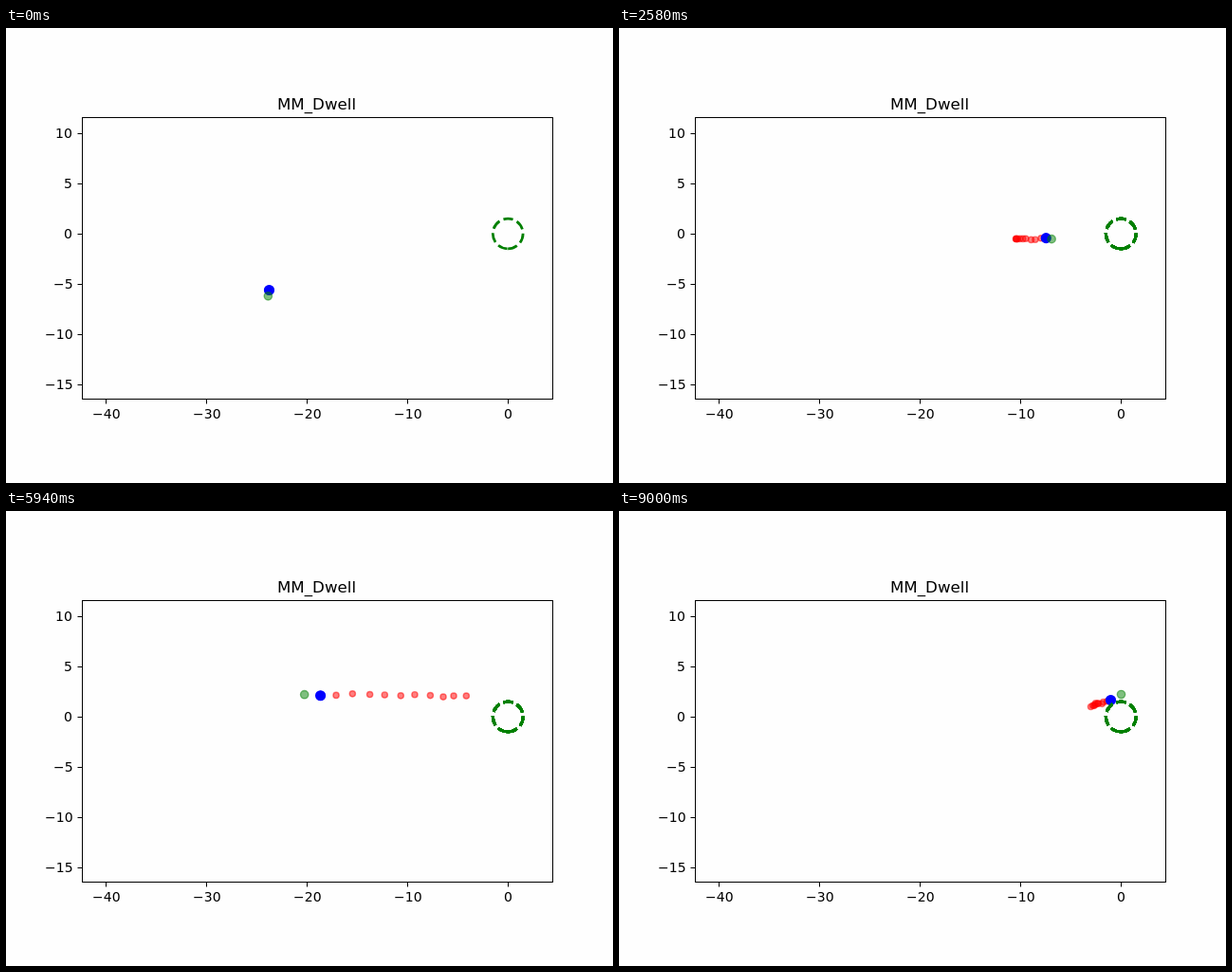
An HTML page with a canvas for the animation above (9030 ms loop, 640 px wide and 480 px high).

```html
<!DOCTYPE html>
<html lang="en">
<head>
<meta charset="utf-8">
<title>MM_Dwell</title>
<style>
  html, body { margin: 0; width: 640px; height: 480px; overflow: hidden; background: #fefefe; }
  canvas { display: block; }
</style>
</head>
<body>
<canvas id="stage" width="640" height="480"></canvas>
<script>
const ctx = document.getElementById('stage').getContext('2d');
const STEP = 30, COUNT = 301, TRAIL = 10, WANDER = 3;
const PT = 100 / 72;
const ORIGIN = { x: 529.2, y: 217 }, UNIT = 10.6;

// Turning points of the cursor: step, x, y
const path = [
  [0, 277, 276], [16, 262, 374], [39, 533, 161], [49, 515, 191],
  [77, 418, 222], [106, 555, 222], [113, 515, 204], [123, 501, 209],
  [147, 380, 214], [167, 477, 212], [181, 526, 198], [217, 101, 187],
  [229, 158, 142], [245, 415, 133], [255, 500, 115], [269, 524, 148],
  [284, 487, 241], [290, 497, 206], [300, 518, 199], [301, 529, 193]
];

const slope = (i, k) => (path[i + 1][k] - path[i][k]) / (path[i + 1][0] - path[i][0]);

// Tangent that never overshoots a turning point
function tangent(i, k) {
  if (i === 0) return slope(0, k);
  if (i === path.length - 1) return slope(i - 1, k);
  const a = slope(i - 1, k), b = slope(i, k);
  if (a * b <= 0) return 0;
  const h0 = path[i][0] - path[i - 1][0], h1 = path[i + 1][0] - path[i][0];
  const w0 = 2 * h1 + h0, w1 = h1 + 2 * h0;
  return (w0 + w1) / (w0 / a + w1 / b);
}

function hermite(i, k, u) {
  const h = path[i + 1][0] - path[i][0], u2 = u * u, u3 = u2 * u;
  return (2 * u3 - 3 * u2 + 1) * path[i][k] + (u3 - 2 * u2 + u) * h * tangent(i, k)
    + (3 * u2 - 2 * u3) * path[i + 1][k] + (u3 - u2) * h * tangent(i + 1, k);
}

let seed = 7;
function random() {
  seed = (seed * 16807) % 2147483647;
  return seed / 2147483647;
}

// Smooth path plus a small tremor that vanishes at the turning points
function place(n) {
  let i = 0;
  while (i < path.length - 2 && n >= path[i + 1][0]) i++;
  const u = (n - path[i][0]) / (path[i + 1][0] - path[i][0]);
  const tremor = WANDER * Math.sin(Math.PI * u);
  return [1, 2].map(k => hermite(i, k, u) + 0.5 + tremor * (random() - 0.5));
}

const spots = Array.from({ length: COUNT + 1 }, (_, n) => place(n));

// Scatter marker: area in square points, with a one point edge
function dot([x, y], area, color, alpha) {
  ctx.globalAlpha = alpha;
  ctx.fillStyle = ctx.strokeStyle = color;
  ctx.lineWidth = PT;
  ctx.beginPath();
  ctx.arc(x, y, Math.sqrt(area) / 2 * PT, 0, Math.PI * 2);
  ctx.fill();
  ctx.stroke();
  ctx.globalAlpha = 1;
}

function line(x0, y0, x1, y1) {
  ctx.beginPath();
  ctx.moveTo(x0, y0);
  ctx.lineTo(x1, y1);
  ctx.stroke();
}

// Text starts on a whole pixel; anchor is the share of its width left of x
function label(text, x, y, anchor, size) {
  ctx.font = size + 'px "DejaVu Sans", sans-serif';
  ctx.fillText(text, Math.round(x - ctx.measureText(text).width * anchor), y);
}

const num = v => String(v).replace('-', '\u2212');

function drawAxes() {
  ctx.strokeStyle = ctx.fillStyle = '#000';
  ctx.lineWidth = 1;
  ctx.strokeRect(80.5, 94.5, 496, 297);
  for (let v = -40; v <= 0; v += 10) {
    const x = 529.5 + v * UNIT;
    line(x, 392, x, 396.5);
    label(num(v), x, 412, 0.5, 14);
  }
  for (let v = -15; v <= 10; v += 5) {
    const y = 217.5 - v * UNIT;
    line(75.5, y, 80, y);
    label(num(v), 70.3, Math.round(y + 4.5), 1, 14);
  }
  label('MM_Dwell', 328, 86, 0.5, 12 * PT);
}

// The ring is painted again at each step, so its edges harden
function drawRing(times) {
  const w = 2 * PT;
  ctx.strokeStyle = '#008000';
  ctx.lineWidth = w;
  ctx.setLineDash([3.7 * w, 1.6 * w]);
  for (let i = 0; i < times; i++) {
    ctx.beginPath();
    ctx.arc(ORIGIN.x, ORIGIN.y, 1.5 * UNIT, Math.PI / 2, -Math.PI * 1.5, true);
    ctx.stroke();
  }
  ctx.setLineDash([]);
}

function draw(n) {
  ctx.fillStyle = '#fefefe';
  ctx.fillRect(0, 0, 640, 480);
  drawAxes();
  for (let i = Math.max(0, n - TRAIL); i < n; i++) dot(spots[i], 20, '#f00', 0.5);
  dot(spots[n], 50, '#00f', 1);
  dot(spots[n + 1], 36, '#008000', 0.5);
  drawRing(Math.min(n + 1, 20));
}

const start = performance.now();
function tick() {
  const t = Math.max(0, performance.now() - start);
  draw(Math.floor(t / STEP) % COUNT);
  requestAnimationFrame(tick);
}
tick();
</script>
</body>
</html>
```
